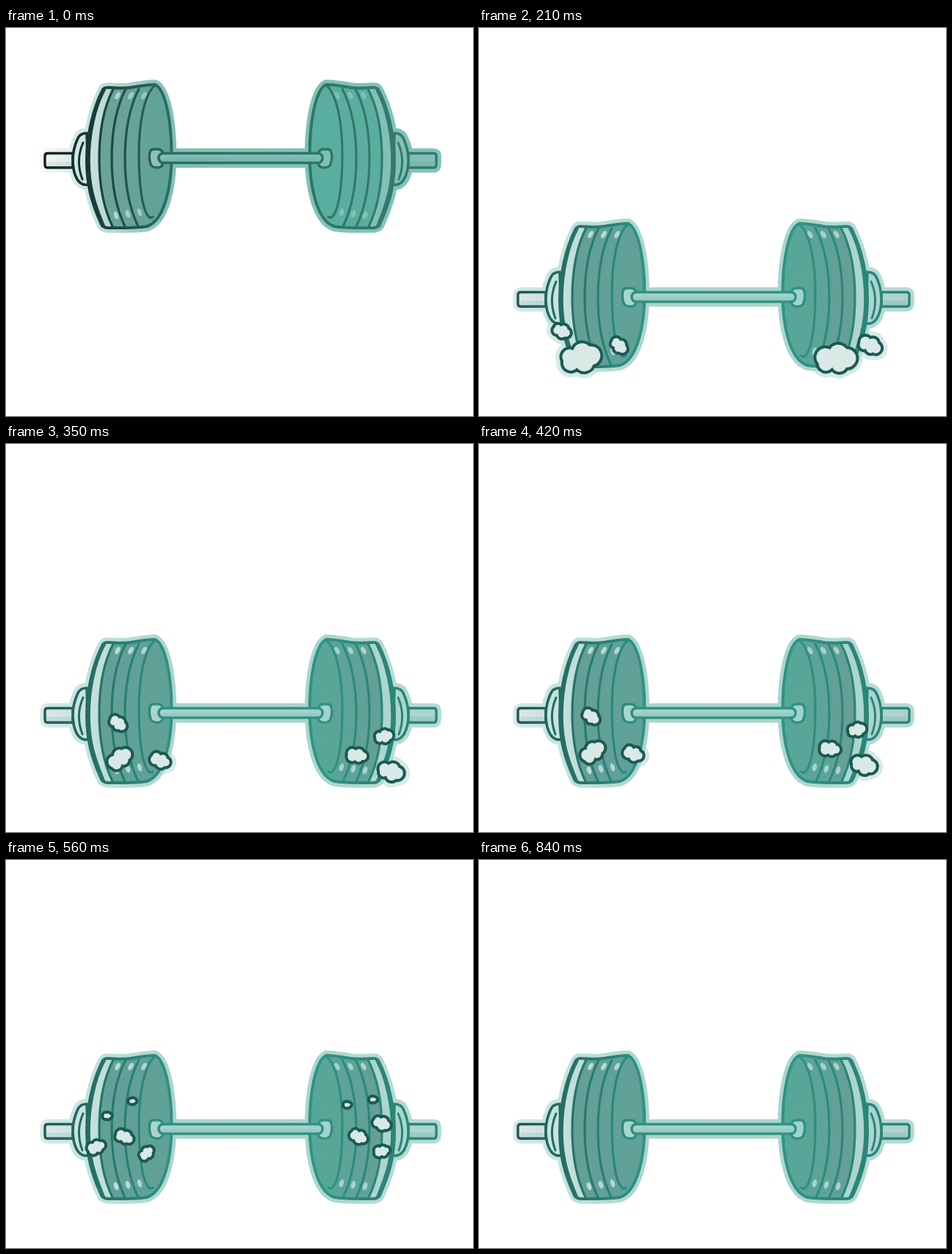
Animation, 636 px wide and 528 px high, one loop 0.91 s. Source, as an HTML page with a canvas:

```html
<!DOCTYPE html>
<html lang="en">
<head>
<meta charset="utf-8">
<title>Barbell drop</title>
<style>
html, body { margin: 0; width: 100%; height: 100%; overflow: hidden; background: #fff; }
canvas { display: block; }
</style>
</head>
<body>
<canvas id="stage" width="636" height="528"></canvas>
<script>
const ctx = document.getElementById('stage').getContext('2d');
const LOOP = 910, BEAT = 70;
const MIRROR = new DOMMatrix([-1, 0, 0, 1, 639, 0]);

// Path for the left half plus its mirror image
function both(d) {
  const left = new Path2D(d), path = new Path2D(left);
  path.addPath(left, MIRROR);
  return path;
}

function box(x, y, w, h, r) {
  const p = new Path2D();
  p.roundRect(x, y, w, h, r);
  return p;
}

const groove = m => `M${m + 19} 83C${m + 5} 110 ${m} 140 ${m} 178C${m} 215 ${m + 6} 245 ${m + 18} 270`;

function glint(x, y, turn) {
  const dx = 5.5 * Math.sin(turn), dy = -5.5 * Math.cos(turn);
  const arc = s => `A3 5.5 ${turn * 180 / Math.PI} 0 1 ${x + s * dx} ${y + s * dy}`;
  return `M${x - dx} ${y - dy}${arc(1)}${arc(-1)}Z`;
}

// Tapered speed line
const streak = ([x, top]) =>
  `M${x} ${top}Q${x + 4} ${top + 40} ${x + 4.5} ${top + 75}V265H${x - 4.5}V${top + 75}Q${x - 4} ${top + 40} ${x} ${top}Z`;

const plate = both('M138 81C150 81 157 83 170 81S190 77 203 77C218 84 225.5 130 225.5 173C225.5 215 216 262 192 270C172 273 150 272 138 272Q131 271 129 265C117 238 110 215 110 180C110 145 119 110 131 86Q133 81 138 81Z');
const rim = both(groove(127) + 'L135 271C122 240 114 215 114 180C114 145 122 105 136 82Z');
const rimEdge = both('M133 84C120 108 112 145 112 180C112 215 119 238 132 269');
const face = both('M203 78C188 90 181 130 181 172C181 215 186 250 198 259C215 250 225 215 225 172C225 130 219 90 203 78Z');
const grooves = both([127, 144, 162].map(groove).join('') + 'M203 78C188 90 181 130 181 172C181 215 186 250 195 257Q197 259 200 257');
const collar = both('M110 143Q100 143 97 152C93 161 91 170 91 180C91 190 93 199 97 206Q103 215 112 213Z');
const collarLine = both('M105 156C98 172 98 190 104 206');
const grip = both('M57 170.5H91V190H56Q53 190 53 186V174Q53 170.5 57 170.5Z');
const gripShade = both('M55 182H90V188H55Z');
const hub = both('M201 165H208Q215 166 215 177Q215 190 207 190Q198 190 197 185Q194 176 196 169Q197 165 201 165Z');
const rod = box(208, 170.5, 223, 13, 6);
const rodShade = box(212, 177, 215, 5, 2);
const glints = both([0, 1, 2].map(i =>
  glint(152 + 18 * i, 92, .55) + glint(150 + 16 * i, 255 - 2 * i, -.3)).join(''));
const streaks = both([[106, 42], [134, 123], [175, 108], [209, 85], [228, 91]].map(streak).join(''));

// Horizontal colour ramp across the stage
function ramp(...colors) {
  const g = ctx.createLinearGradient(50, 0, 500, 0);
  colors.forEach((c, i) => g.addColorStop([0, .38, .84, 1][i], c));
  return g;
}

const rest = {
  halo: ramp('#f6f9f8', '#80bfb4', '#80c1b7', '#83c3b9'),
  line: ramp('#0b1d1b', '#2b6d64', '#2f756a', '#34796e'),
  body: ramp('#78a39b', '#5fa397', '#5aae9f', '#5aae9f'),
  light: ramp('#f6f8f7', '#80bbb1', '#7fc0b5', '#80c1b7')
};
const fall = {
  halo: ramp('#f3f8f7', '#a6d2ca', '#a6d2ca', '#b3d9d2'),
  line: ramp('#123f39', '#2f9384', '#2f9485', '#2b8478'),
  body: ramp('#6b9e97', '#60a097', '#56a698', '#66a098'),
  light: ramp('#f0f5f4', '#a5d1c9', '#a3d1c9', '#abd5ce')
};
const land = {
  halo: ramp('#d6eae6', '#abd5ce', '#abd5ce', '#b5dad4'),
  line: ramp('#1c5951', '#2f9284', '#2f9485', '#2b8579'),
  body: ramp('#659f97', '#5fa198', '#56a798', '#64a098'),
  light: ramp('#d9e9e6', '#a4d2ca', '#a3d2ca', '#abd5ce')
};

// Dust clouds as x, y, size, tilt; each group drifts upward by `speed` per beat
// and stands at the given places on beat `home`
const dust = [
  { from: 2, home: 3, speed: 21, clouds: [
    [137, 428, 16, -.2], [112, 391, 7, .4], [190, 411, 7, .7], [485, 430, 16, -.1], [532, 411, 9, .4]] },
  { from: 4, home: 5, speed: 9, clouds: [
    [152, 371, 7, .6], [155, 420, 10, -.7], [210, 421, 8, .4],
    [478, 415, 8, .1], [514, 389, 7, -.2], [523, 437, 10, .2]] },
  { from: 6, home: 7, speed: 9, clouds: [
    [123, 391, 7, -.4], [138, 348, 3, 0], [172, 328, 2.5, 0], [161, 377, 7, .4], [191, 399, 6, -.7],
    [465, 333, 2.5, 0], [500, 326, 2.5, 0], [480, 376, 7, .5], [511, 358, 7, .4], [512, 396, 6, -.2]] }
];

function fill(path, color) {
  ctx.fillStyle = color;
  ctx.fill(path);
}

function stroke(path, color, width) {
  ctx.strokeStyle = color;
  ctx.lineWidth = width;
  ctx.stroke(path);
}

// A cloud is a ring of uneven lobes squeezed along its tilt
function puff([x, y, size, tilt], pad) {
  ctx.save();
  ctx.translate(x, y);
  ctx.rotate(tilt);
  ctx.beginPath();
  for (let k = 0; k < 5; k++) {
    const a = k * Math.PI * .4;
    const r = size * (.55 + .25 * Math.abs(Math.sin(k * 2.4 + x)));
    ctx.moveTo(0, 0);
    ctx.arc(Math.cos(a) * size, Math.sin(a) * size * .45, r + pad, 0, 7);
  }
  ctx.fill();
  ctx.restore();
}

function puffs(clouds, pad, color) {
  ctx.fillStyle = color;
  clouds.forEach(c => puff(c, pad));
}

function drips(clouds) {
  ctx.fillStyle = '#000';
  for (const [x, y, size] of clouds) {
    ctx.fillRect(x + 1, y + size, size / 3, 12 + 8 * Math.sin(x));
  }
}

function barbell(c) {
  for (const p of [grip, collar, plate, rod]) {
    fill(p, c.halo);
    stroke(p, c.halo, 13.5);
  }
  fill(grip, c.light);
  fill(gripShade, 'rgba(60,130,120,.12)');
  stroke(grip, c.line, 3.4);
  fill(collar, c.light);
  stroke(collar, c.line, 3.6);
  stroke(collarLine, c.line, 3);
  fill(plate, c.body);
  fill(face, c.body);
  fill(rim, c.light);
  stroke(grooves, c.line, 3.2);
  stroke(rimEdge, c.line, 5.5);
  stroke(plate, c.line, 4);
  fill(glints, c.light);
  fill(hub, c.light);
  stroke(hub, c.line, 3.4);
  fill(rod, c.light);
  fill(rodShade, 'rgba(60,140,128,.12)');
  stroke(rod, c.line, 3.6);
}

// Held high, falls, hits the floor, bounces once, stays down
function draw(beat) {
  const drop = beat === 0 ? 0 : beat === 1 || beat === 3 ? 128 : 189;
  const look = beat === 0 ? rest : beat === 1 ? fall : land;
  const group = beat < 11 && dust.findLast(g => g.from <= beat);
  const clouds = group
    ? group.clouds.map(([x, y, ...shape]) => [x, y - (beat - group.home) * group.speed, ...shape])
    : [];
  const ink = beat >= 9;

  ctx.fillStyle = '#fff';
  ctx.fillRect(0, 0, 636, 528);
  ctx.lineJoin = ctx.lineCap = 'round';
  if (beat === 1) fill(streaks, look.halo);
  if (!ink) puffs(clouds, 9.5, look.halo);

  ctx.save();
  ctx.translate(0, drop);
  barbell(look);
  ctx.restore();

  if (ink) drips(clouds);
  puffs(clouds, 4, ink ? '#000' : look.line);
  puffs(clouds, 0, look.light);
}

let shown;
function tick() {
  // The opening pose holds for two beats
  const beat = Math.max(0, Math.floor(performance.now() % LOOP / BEAT) - 1);
  if (beat !== shown) draw(shown = beat);
  requestAnimationFrame(tick);
}
tick();
</script>
</body>
</html>
```
